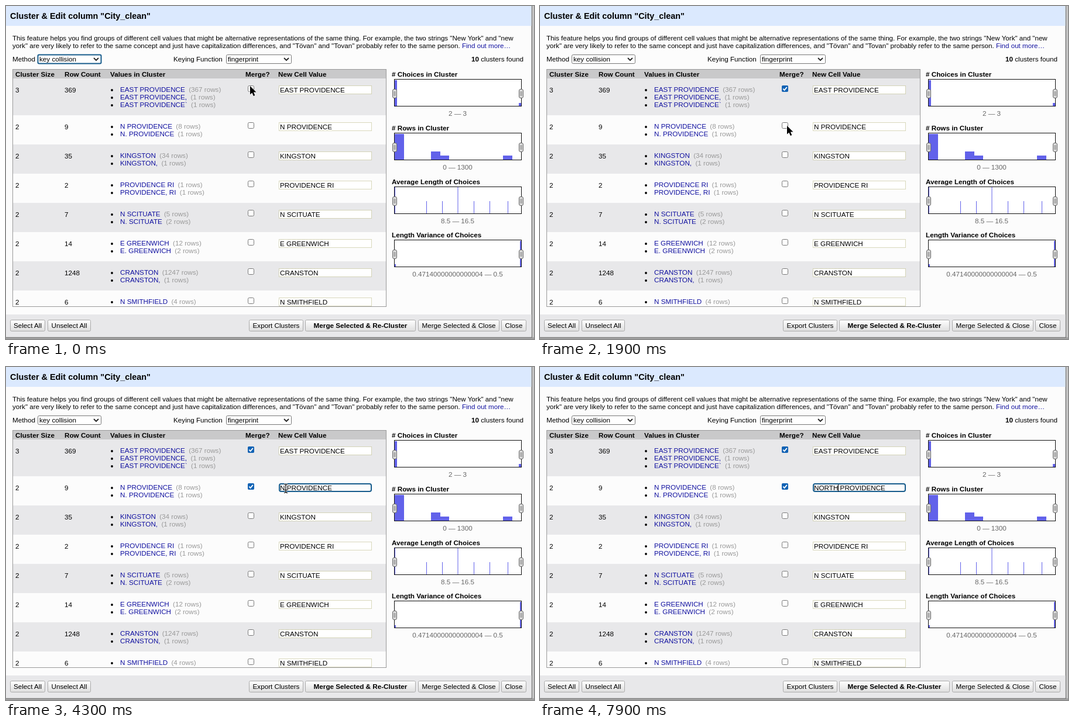
Animation, 902 px wide and 570 px high, one loop 8 s. Source, as an HTML page:

```html
<!DOCTYPE html>
<html lang="en">
<head>
<meta charset="utf-8">
<title>Cluster and edit</title>
<style>
html, body { margin: 0; width: 100%; height: 100%; overflow: hidden; background: #fcfcfc; }
svg { display: block; width: 902px; height: 570px; }
text { font: 11.7px "Liberation Sans", Arial, sans-serif; fill: #000; }
.bold { font-weight: bold; }
.title { font-weight: bold; font-size: 14.4px; }
.para { font-size: 11.6px; }
.link { fill: #1111a0; }
.count { fill: #999; }
.range { fill: #666; text-anchor: middle; }
.mid { text-anchor: middle; }
</style>
</head>
<body>
<svg id="stage" viewBox="0 0 902 570">
  <defs>
    <linearGradient id="face" x2="0" y2="1">
      <stop stop-color="#fff"/><stop offset="1" stop-color="#dedede"/>
    </linearGradient>
    <clipPath id="tableClip"><rect x="11" y="108" width="639" height="406.5"/></clipPath>
  </defs>
</svg>
<script>
const stage = document.getElementById('stage');
const PALE = '#e8e8ea', HEAD = '#c9c9ca', BLUE = '#6262ea', FOCUS = '#175c8c';

function add(tag, attrs, parent = stage) {
  const node = document.createElementNS('http://www.w3.org/2000/svg', tag);
  for (const key in attrs) node.setAttribute(key, attrs[key]);
  parent.append(node);
  return node;
}
const box = (x, y, width, height, fill, more, parent) =>
  add('rect', { x, y, width, height, fill, ...more }, parent);
const path = (d, stroke, more, parent) => add('path', { d, stroke, fill: 'none', ...more }, parent);
function label(x, y, str, cls = '', parent = stage) {
  const node = add('text', { x, y, class: cls }, parent);
  node.textContent = str;
  return node;
}
function span(parent, str, cls, dx = 0) {
  add('tspan', { class: cls, dx }, parent).textContent = str;
}
const show = (node, on) => node.setAttribute('visibility', on ? 'visible' : 'hidden');

// Dialog frame
box(0, 0, 902, 570, '#c6c6c6');
box(0, 567, 902, 3, '#a2a2a2');
box(0, 0, 899, 568, '#7c7c7c');
box(0, 0, 897.5, 566.5, '#fcfcfc');
box(0, 0, 897.5, 34, '#dbe9fe');
box(0, 528, 897.5, 38.5, PALE);
label(7, 22, 'Cluster & Edit column "City_clean"', 'title');
label(11, 59, 'This feature helps you find groups of different cell values that might be alternative representations of the same thing. For example, the two strings "New York" and "new', 'para');
const intro = label(11, 72, 'york" are very likely to refer to the same concept and just have capitalization differences, and "Tövan" and "Tovan" probably refer to the same person. ', 'para');
span(intro, 'Find out more…', 'link');

// Selects
function select(x, width, str) {
  const frame = box(x + .5, 83.5, width, 15, '#fff', { rx: 2, stroke: '#777' });
  label(x + 3, 95, str);
  path(`M${x + width - 12} 89l4 4 4-4`, '#222', { 'stroke-width': 1.8 });
  return frame;
}
label(11, 95, 'Method');
const method = select(54, 108, 'key collision');
label(286, 95, 'Keying Function');
select(376, 111, 'fingerprint');
const found = label(795, 95, '');
span(found, '10', 'bold');
span(found, 'clusters found', '', 3.2);

// Table
const table = add('g', { 'clip-path': 'url(#tableClip)' });
box(11, 108, 639, 16, HEAD, {}, table);
[[16, 'Cluster Size'], [100, 'Row Count'], [178, 'Values in Cluster'], [409, 'Merge?'], [465, 'New Cell Value']]
  .forEach(([x, str]) => label(x, 121, str, 'bold', table));

const rows = [
  [369, 'EAST PROVIDENCE', 367, 'EAST PROVIDENCE,', 1, 'EAST PROVIDENCE`', 1],
  [9, 'N PROVIDENCE', 8, 'N. PROVIDENCE', 1],
  [35, 'KINGSTON', 34, 'KINGSTON,', 1],
  [2, 'PROVIDENCE RI', 1, 'PROVIDENCE, RI', 1],
  [7, 'N SCITUATE', 5, 'N. SCITUATE', 2],
  [14, 'E GREENWICH', 12, 'E. GREENWICH', 2],
  [1248, 'CRANSTON', 1247, 'CRANSTON,', 1],
  [6, 'N SMITHFIELD', 4, 'N. SMITHFIELD', 2]
];
const cells = rows.map(([total, ...values], i) => {
  const top = i ? 137 + 50 * i : 124;
  const base = i ? top + 23 : 147;
  if (i % 2 == 0) box(11, top, 639, i ? 50 : 63, PALE, {}, table);
  label(16, base + 1, values.length / 2, '', table);
  label(100, base + 1, total, '', table);
  for (let k = 0; k < values.length; k += 2) {
    const y = base + 6.5 * k;
    add('circle', { cx: 181, cy: y - 3, r: 1.9 }, table);
    const line = label(195, y, values[k], 'link', table);
    span(line, `(${values[k + 1]} rows)`, 'count', 6.3);
  }
  box(413.5, base - 10.5, 10, 10, '#fff', { rx: 2, stroke: '#777' }, table);
  const tick = add('g', {}, table);
  box(413, base - 11, 11, 11, '#1263b5', { rx: 2 }, tick);
  path(`M415.3 ${base - 5.3}l2.3 2.4 4.2-5.2`, '#fff', { 'stroke-width': 1.7 }, tick);
  const frame = box(466.5, base - 10.5, 158, 14, '#fff', { stroke: '#b5b37a', 'stroke-dasharray': '1 1' }, table);
  const text = label(468, base + 1, values[0], '', table);
  return { tick, frame, text };
});
box(11.5, 108.5, 638, 406, 'none', { stroke: '#999' });

// Facet histograms: [title, range, top, ...bars as x, width, height]
[
  ['# Choices in Cluster', '2 — 3', 125, [664, 4, 44], [876, 4, 5]],
  ['# Rows in Cluster', '0 — 1300', 217, [664, 16, 44], [726, 16, 14], [742, 15, 7], [849, 16, 7]],
  ['Average Length of Choices', '8.5 — 16.5', 309, [664, 1, 45], [718, 1, 21], [745, 1, 21], [771.5, 1, 45], [799, 1, 21], [826, 1, 21], [857, 1, 21]],
  ['Length Variance of Choices', '0.47140000000000004 — 0.5', 400, [664, 2, 4], [878, 2, 44]]
].forEach(([title, range, top, ...bars]) => {
  label(659, top == 400 ? 396 : top - 4.5, title, 'bold');
  box(663.5, top + .5, 217, 46, '#fff', { stroke: '#111' });
  bars.forEach(([x, w, h]) => box(x, top + 46 - h, w, h, BLUE));
  [660, 876].forEach(x => {
    box(x + .5, top + 17.5, 7, 15, '#dcdcdc', { rx: 2.5, stroke: '#666' });
    path(`M${x + 3} ${top + 21}v8M${x + 5} ${top + 21}v8`, '#777', { 'stroke-width': .9 });
  });
  label(771.5, top + 62.5, range, 'range');
});

// Footer buttons
[
  [7, 59, 'Select All'], [71, 73, 'Unselect All'], [415, 92, 'Export Clusters'],
  [511, 188, 'Merge Selected & Re-Cluster', 'bold'], [704, 138, 'Merge Selected & Close'], [846, 42, 'Close']
].forEach(([x, w, str, cls = '']) => {
  box(x + .5, 537.5, w, 19, 'url(#face)', { rx: 2, stroke: '#aaa' });
  label(x + w / 2 + .5, 551, str, 'mid ' + cls);
});

// Moving parts
const focusRing = box(467, 200, 157, 13, 'none', { rx: 3, stroke: FOCUS, 'stroke-width': 2 });
const caret = box(0, 201, 1, 12, '#000');
const arrow = path('M0 0V14.5L3.4 11.4 5.8 17 8.3 15.9 5.9 10.5H10.5Z', '#fff', { fill: '#000', 'stroke-width': 1, 'paint-order': 'stroke' });
const beam = add('g', {});
const beamShape = 'M-3-7.5Q0-7.5 0-5Q0-7.5 3-7.5M0-5V5M-3 7.5Q0 7.5 0 5Q0 7.5 3 7.5M-2 2.5H2';
path(beamShape, '#fff', { 'stroke-width': 2.6 }, beam);
path(beamShape, '#000', { 'stroke-width': 1.2 }, beam);

// Pointer stops: time, x, y
const stops = [[0, 417, 137], [500, 422, 142], [1300, 422, 142], [1900, 422, 205],
  [2400, 422, 205], [3300, 478, 208], [8000, 478, 208]];
const clicks = { first: 800, second: 2100, field: 3800 };
const beamHidden = 4500;
const keys = [[5800, 'O'], [6600, 'R'], [7100, 'T'], [7500, 'H']];

function pointer(t) {
  const i = stops.findIndex(s => s[0] > t);
  const [t0, x0, y0] = stops[i - 1], [t1, x1, y1] = stops[i];
  const u = (t - t0) / (t1 - t0), e = u * u * (3 - 2 * u);
  return [x0 + (x1 - x0) * e, y0 + (y1 - y0) * e];
}

function draw(now) {
  const t = Math.floor(now % 8000 / 100) * 100;
  const methodFocus = t < clicks.first;
  method.setAttribute('stroke', methodFocus ? FOCUS : '#777');
  method.setAttribute('stroke-width', methodFocus ? 2 : 1);
  cells.forEach((cell, i) => show(cell.tick, i == 0 && t >= clicks.first || i == 1 && t >= clicks.second));

  const typed = keys.filter(k => k[0] <= t);
  const word = 'N' + typed.map(k => k[1]).join('');
  const field = cells[1];
  field.text.textContent = word + ' PROVIDENCE';
  const focused = t >= clicks.field;
  show(focusRing, focused);
  show(field.frame, !focused);
  const last = typed.length ? typed[typed.length - 1][0] : clicks.field;
  show(caret, focused && (t - last) % 1000 < 500);
  caret.setAttribute('x', 468 + Math.round(field.text.getSubStringLength(0, word.length)));

  const [x, y] = pointer(t);
  const overField = x >= 466;
  show(arrow, !overField);
  show(beam, overField && t < beamHidden);
  for (const node of [arrow, beam]) node.setAttribute('transform', `translate(${x} ${y})`);
}

const start = performance.now();
function tick() {
  draw(performance.now() - start);
  requestAnimationFrame(tick);
}
tick();
</script>
</body>
</html>
```
